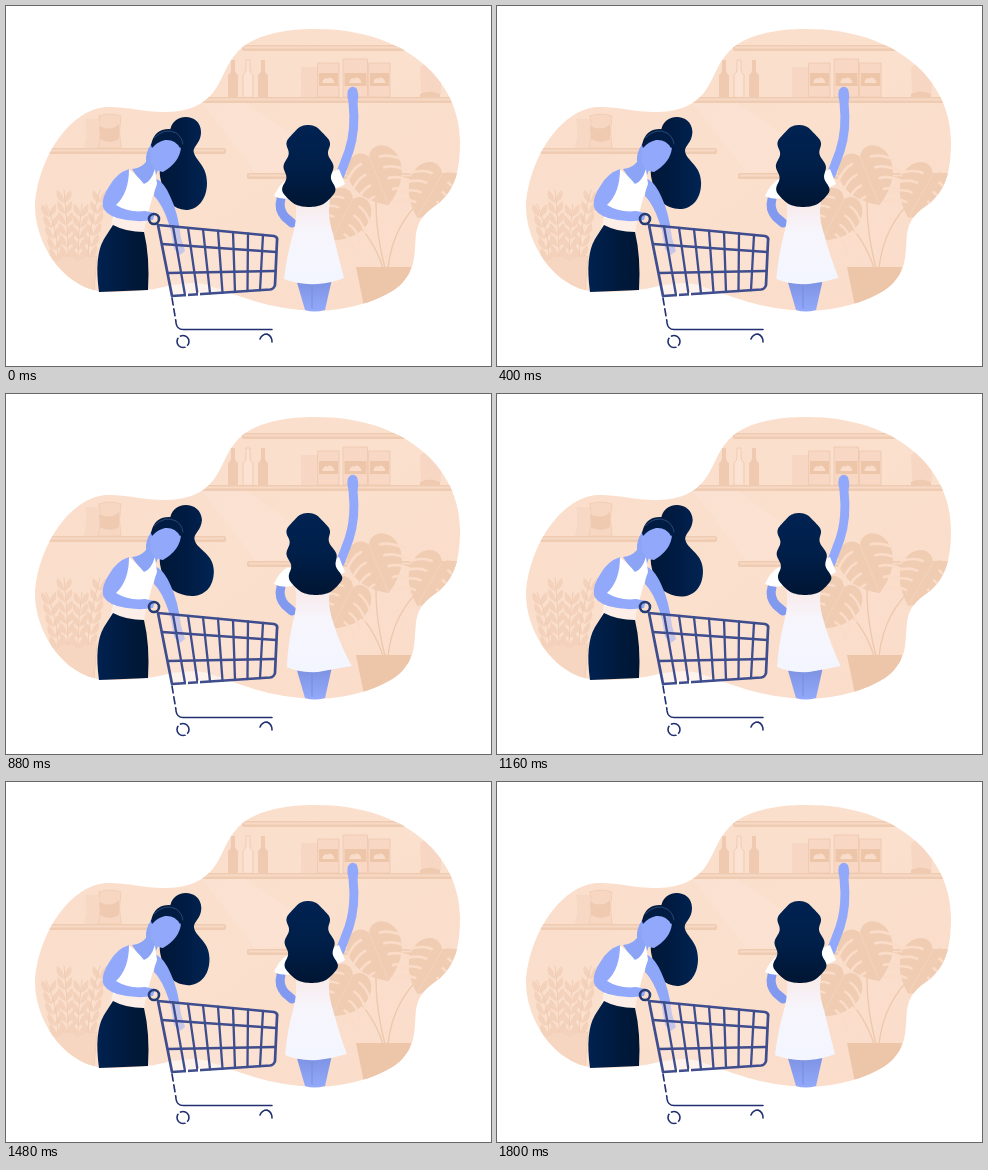
Animation, 485 px wide and 360 px high, one loop 1.92 s. Source, as an HTML page:

```html
<!DOCTYPE html>
<html lang="en">
<head>
<meta charset="utf-8">
<title>Shopping</title>
<style>
html, body { margin: 0; width: 100%; height: 100%; overflow: hidden; background: #fff; }
svg { display: block; width: 485px; height: 360px; }
</style>
</head>
<body>
<svg viewBox="0 0 485 360" fill="none" stroke-linecap="round" stroke-linejoin="round">
  <defs>
    <clipPath id="room">
      <path d="M29 200C31 156 62 103 101 101C125 101 135 106 160 106C215 105 212 68 229 49
        C245 28 280 23 310 23C400 23 454 75 454 135C454 165 449 183 433 197C420 206 412 213 410 228
        C408 250 410 261 397 276C385 291 345 305 310 305C260 303 235 290 207 281
        C190 274 180 278 165 279C145 285 125 286 100 286C60 284 29 240 29 200Z"/>
    </clipPath>
    <linearGradient id="wall" x1="0" y1="0" x2="1" y2="1">
      <stop stop-color="#fadcc9"/><stop offset=".48" stop-color="#fbe0ce"/><stop offset="1" stop-color="#f9dac6"/>
    </linearGradient>
    <linearGradient id="lockFill"><stop stop-color="#001838"/><stop offset=".45" stop-color="#001b42"/><stop offset="1" stop-color="#012453"/></linearGradient>
    <linearGradient id="waveFill" x1="0" y1="0" x2="0" y2="1"><stop stop-color="#012353"/><stop offset=".5" stop-color="#001f49"/><stop offset="1" stop-color="#001533"/></linearGradient>
    <linearGradient id="skirtFill"><stop stop-color="#002150"/><stop offset=".6" stop-color="#001a3d"/><stop offset="1" stop-color="#001633"/></linearGradient>
    <linearGradient id="dressFill" x1="0" y1="0" x2="0" y2="1">
      <stop offset=".2" stop-color="#f8ebec"/><stop offset=".45" stop-color="#f7f5fc"/><stop offset="1" stop-color="#f3f6ff"/>
    </linearGradient>
    <linearGradient id="legFill" x1="0" y1="0" x2="0" y2="1"><stop stop-color="#7c91e0"/><stop offset="1" stop-color="#93a9fb"/></linearGradient>
  </defs>

  <g clip-path="url(#room)">
    <path fill="url(#wall)" d="M0 0H485V360H0Z"/>
    <path fill="#fce4d5" opacity=".55" d="M196 97L240 97 330 160 250 167Z"/>
    <g fill="#efcbb1" id="shelves"></g>
    <g id="bottles"></g>
    <path fill="#f7d7c3" d="M295 61H312V91H295ZM414 61L420 57 435 68V88H415Z"/>
    <path fill="#efcab0" d="M414 88Q423 83 434 88V91H414Z"/>
    <g id="boxes"></g>
    <path fill="#f7d8c4" d="M78 142Q82 124 79 113H93V142Z"/>
    <path fill="#f7d7c2" stroke="#efcbb1" stroke-width=".8" d="M93 110Q104 106 115 110Q112 125 115 142H92Q96 125 93 110Z"/>
    <path fill="#efcab0" d="M93 120Q105 126 113 118V133Q104 139 94 133Z"/>
    <path fill="#f7d6c1" stroke="#f1cfb7" d="M46 250H91L88 285H49Z"/>
    <g id="sprigs" fill="#f3d1ba"></g>
    <path stroke="#edc8ad" stroke-width="1.3" d="M371 178Q367 216 379 262M344 211Q367 231 377 262M418 192Q387 218 382 262"/>
    <g id="leaves"></g>
    <path fill="#edc5a8" d="M350 261H405L394 310H360Z"/>
  </g>

  <!-- woman with cart -->
  <path id="lock" fill="url(#lockFill)"/>
  <path fill="#8ca4f6" d="M146 137Q139 146 140 156Q135 162 126 163L138 181 146 179 152 164Z"/>
  <path fill="#92a9fb" d="M144 139Q152 131 163 132Q173 135 175 141Q174 156 157 166Q148 165 145 157Z"/>
  <path fill="#001c43" d="M145 139Q148 123 163 123Q176 123 178 140L174 142Q169 133 159 134Q151 136 146 142Z"/>
  <path stroke="#36507e" stroke-width=".8" d="M148 132Q159 121 170 127Q176 131 177 138"/>
  <path fill="#8fa7f8" d="M149 172Q158 176 164 190Q172 206 175 232L179 245 174 249 168 243 165 225Q158 200 148 190Z"/>
  <path fill="#fff" d="M122 163Q130 168 138 178Q145 176 149 163L151 178Q146 191 143 204L138 222 106 216Q111 198 107 185Z"/>
  <path fill="#fdeee8" d="M107 212L140 214 138 227 104 222Z"/>
  <path fill="url(#skirtFill)" d="M107 219Q120 226 138 226Q144 251 142 284L93 286Q88 250 98 233Z"/>
  <path fill="#92a9fb" d="M123 163Q111 167 104 179Q95 192 97 201Q99 208 111 212Q129 217 147 214L149 207 139 205Q123 207 110 199Q123 187 123 163Z"/>

  <!-- reaching woman -->
  <path stroke="#92a9fb" stroke-width="9" d="M347 96Q350 124 343 145L334 169"/>
  <path fill="#92a9fb" d="M342 84Q346 78 351 83Q354 93 350 99H344Q340 91 342 84Z"/>
  <path stroke="#8299f0" stroke-width="9" d="M275 193Q272 203 279 211L286 217"/>
  <path fill="url(#legFill)" d="M290 273H326L319 304Q308 307 299 304Z"/>
  <path stroke="#778ee0" d="M306 276V302"/>
  <path fill="#fff" d="M282 173Q273 178 268 190Q275 194 286 192L294 178ZM322 168L333 163 339 178Q332 183 325 182Z"/>
  <path id="dress" fill="url(#dressFill)"/>
  <path id="waves" fill="url(#waveFill)"/>

  <g stroke="#3e4d8e" stroke-width="2.3">
    <circle cx="148" cy="213" r="5" stroke="#263c75" stroke-width="2.6"/>
    <path stroke-width="2.7" fill="#fce6da" fill-opacity=".5" d="M152 219L268 230Q272 231 271 235L269 279Q268 283 264 283.500L166 290Z"/>
    <path d="M156 238L270 246M162 267L269 265"/>
    <path id="bars"/>
    <g stroke="#202f70" stroke-width="1.6">
      <path stroke-dasharray="7 4" d="M166 292L170 316"/>
      <path d="M170 317Q171 323.500 177 323.500H266"/>
      <circle cx="177" cy="335.500" r="6"/>
      <path d="M254 333Q256 328 261 328Q266 330 266 336"/>
    </g>
    <path stroke="#fff" stroke-width="2" d="M181 287V291M193 287V290M172 330L174 332M180 340L182 342"/>
  </g>
</svg>
<script>
const byId = id => document.getElementById(id);
const draw = (id, d) => byId(id).setAttribute('d', d);
const fill = (id, count, make) => {
  byId(id).innerHTML = Array.from({ length: count }, (_, i) => make(i)).join('');
};
const clamp = v => Math.min(1, Math.max(0, v));

const shelf = (x, y, w) => `<rect x="${x}" y="${y}" width="${w}" height="6" rx="2"/>
  <path fill="#f8d9c5" d="M${x + 2} ${y + 1.5}h${w - 4}v2h${4 - w}z"/>`;
byId('shelves').innerHTML =
  shelf(236, 39, 220) + shelf(190, 91, 260) + shelf(42, 142, 178) + shelf(241, 167, 212);

fill('bottles', 3, i => {
  const style = i === 1 ? 'fill="#fbe2d2" stroke="#efcbb1"' : 'fill="#efcab0"';
  return `<path ${style} d="M${222 + i * 15} 91v-22q3-2 3-6v-9h4v9q0 4 3 6v22z"/>`;
});

fill('boxes', 3, i => {
  const w = i === 1 ? 24 : 21, x = 312 + i * 25.5, y = i === 1 ? 53 : 57;
  return `<path fill="#f8d8c4" stroke="#edc6ab" stroke-width=".8" d="M${x} ${y}h${w}V91h${-w}z"/>
    <path fill="#edc5a9" d="M${x + 1} 67h${w - 2}v13h${2 - w}z"/>
    <path fill="#f9dcc9" d="M${x + w / 2 - 6} 75q3-5 5-2q2-4 6 1l1 3h-12z"/>`;
});

fill('sprigs', 4, i => {
  const x = 52 + i * 10, top = i % 2 ? 184 : 198, tilt = i * 8 - 12;
  let shape = '';
  for (let y = top; y < 248; y += 11) {
    shape += `M${x + tilt * (248 - y) / 65} ${y + 13}q-10-4-7-13q7 4 7 13q0-9 7-13q3 9-7 13z`;
  }
  return `<path d="${shape}"/><path stroke="#efccb3" fill="none" d="M${x + tilt} ${top}Q${x} 225 ${x} 250"/>`;
});

function leaf(x, y, size, angle) {
  let cuts = '';
  for (const side of [-1, 1]) {
    for (let row = -18; row < 30; row += 15) {
      cuts += `M${side * 38} ${row + 13}Q${side * 25} ${row} ${side * 13} ${row - 1}`;
    }
  }
  return `<g transform="translate(${x} ${y}) rotate(${angle}) scale(${size})">
    <path fill="#efccb2" d="M0-24C10-42 36-31 35-5C34 17 17 33 0 43C-17 33-34 17-35-5C-36-31-10-42 0-24Z"/>
    <path stroke="#fadcc8" stroke-width="3.500" d="${cuts}"/>
    <path stroke="#f5d6c1" d="M0-24V40"/></g>`;
}
byId('leaves').innerHTML = leaf(370, 168, .78, -22) + leaf(339, 208, .7, 28) + leaf(427, 184, .74, 30);

let bars = '';
for (let i = 0; i < 7; i++) {
  bars += `M${167 + i * 15} ${220.5 + i * 1.4}L${179 + i * 12.5} ${289 - i * .8}`;
}
draw('bars', bars);

// Rounded column of hair with rippling sides; only the lower part swings.
function waves(k) {
  const top = 119, height = 82, left = [], right = [];
  for (let i = 0; i <= 80; i++) {
    const u = (1 - Math.cos(Math.PI * i / 80)) / 2, y = top + height * u;
    const cap = Math.sqrt(1 - Math.abs(2 * u - 1) ** 5);
    const half = cap * (18.5 + 9 * u + 2 * Math.cos((y - 136) / 24 * 2 * Math.PI));
    const middle = 302 + u + 7 * k * clamp((y - 142) / 42);
    left.push(`${(middle - half).toFixed(2)} ${y.toFixed(2)}`);
    right.unshift(`${(middle + half).toFixed(2)} ${y.toFixed(2)}`);
  }
  return 'M' + left.concat(right).join('L') + 'Z';
}

function lock(k) {
  const s = 7 * k, edge = 201 + s, low = 204 - 2 * k;
  return `M164 127C164 106 195 106 ${195 + k} 126C195 138 186 140 ${188 + k} 147
    C${191 + k} 156 ${edge} 160 ${edge} 177C${edge} 194 ${191 + s} ${low} ${180 + s * .8} ${low}
    C${167 + s * .6} ${low - 1} ${160 + s * .3} 195 157 183C155 175 153 168 154 164Z`;
}

function dress(k) {
  return `M288 180H325L323 205Q323 216 327 228Q${333 + k * 2} 253 ${338 + k * 8} 272
    Q${326 + k * 2} ${277 - k * 2} 312 278Q292 279 ${278 + k * 3} 273
    Q${281 + k} 248 287 228Q291 214 290 200Z`;
}

// Steady swing out and back in 40 ms steps, with a short rest at the end.
function sway(ms) {
  const t = Math.min(Math.floor(ms / 40) * 40, 1800);
  return 1 - Math.abs(1 - t / 900);
}

function frame() {
  const k = sway(performance.now() % 1920);
  draw('lock', lock(k));
  draw('waves', waves(k));
  draw('dress', dress(k));
  requestAnimationFrame(frame);
}
frame();
</script>
</body>
</html>
```
